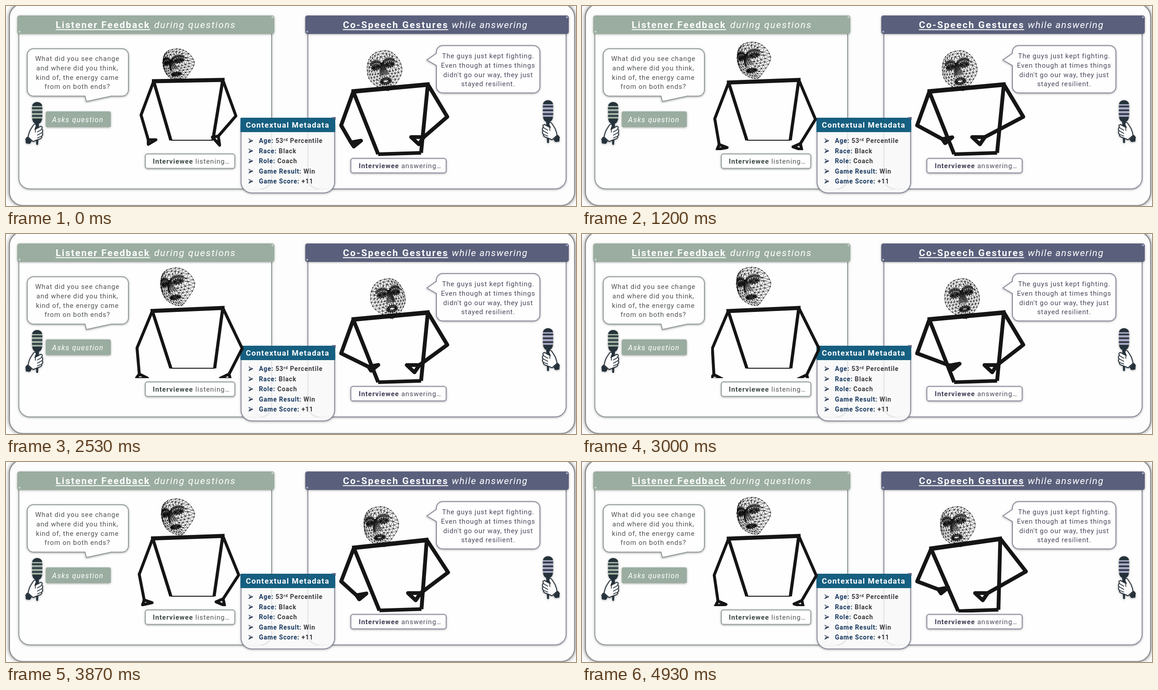
These frames come from a looping animation (1262 by 444 pixels, 5 s). An HTML page:

```html
<!DOCTYPE html>
<html lang="en">
<head>
<meta charset="utf-8">
<title>Interview gestures</title>
<style>
html, body { margin: 0; width: 100%; height: 100%; overflow: hidden; background: #fdfdfd; }
svg { display: block; width: 1262px; height: 444px; font-family: Roboto, sans-serif; }
.head { font-size: 21px; fill: #fff; }
.b { font-weight: 700; }
.i { font-style: italic; }
.say { font-size: 15px; letter-spacing: .88px; text-anchor: middle; }
.tag { font-size: 15px; letter-spacing: 1px; }
.meta { font-size: 14px; font-weight: 700; letter-spacing: .85px; fill: #3b3b40; }
.meta .k { fill: #17375e; }
.green { stroke: #929c97; }
.violet { stroke: #8a8c9e; }
.box { fill: #fefefe; stroke-width: 2; filter: url(#shade); }
.man { fill: none; stroke: #151515; stroke-linejoin: round; }
.mesh { fill: none; stroke: #121212; stroke-width: .8; }
.dots { fill: none; stroke: #0c0c0c; stroke-width: 2; stroke-linecap: round; }
</style>
</head>
<body>
<svg viewBox="0 0 1262 444">
  <defs>
    <filter id="shade" x="-10%" y="-20%" width="120%" height="140%">
      <feDropShadow dx="0" dy="1" stdDeviation="2" flood-color="#444" flood-opacity=".5"/>
    </filter>
    <filter id="deep">
      <feDropShadow dx="0" dy="0" stdDeviation="4" flood-color="#555" flood-opacity=".7"/>
    </filter>
    <clipPath id="clipL"><rect x="286" y="64" width="241" height="256"/></clipPath>
    <clipPath id="clipR"><rect x="732" y="68" width="279" height="266"/></clipPath>
    <g id="mic">
      <path d="M58 222a11 9 0 0 1 22 0Z" fill="#27313a"/>
      <path d="M58 222H80V250H58Z" fill="currentColor"/>
      <path d="M57.500 227H80.500M57.500 235.500H80.500M57.500 244H80.500" stroke="#27313a" stroke-width="3.500"/>
      <path d="M58 250H80Q79 259 73 261L71 308H67L65 261Q59 259 58 250Z" fill="#27313a"/>
      <path d="M61 264Q66 260 67 266L64 274L77 267Q82 268 79 273Q83 276 80 281Q83 285 79 289Q80 293 75 295L67 298L60 301L49 291Q51 281 54 275Z"
        fill="#fdfdfd" stroke="#27313a" stroke-width="2" stroke-linejoin="round"/>
      <path d="M65 274V281M69 280L79 274M69 287L80 281M69 293L79 289" fill="none" stroke="#27313a" stroke-width="1.600"/>
      <path d="M47 290L57 300L53 306L44 305L43 295Z" fill="#27313a"/>
    </g>
  </defs>

  <rect width="1262" height="444" fill="#fdfdfd"/>
  <rect x="7.500" y="-5" width="1251.500" height="448" rx="30" fill="#fdfdfd" stroke="#8f8f8f" stroke-width="2.500" filter="url(#deep)"/>

  <path class="box green" d="M28.500 50H588V382a24 24 0 0 1 -24 24H52.500a24 24 0 0 1 -24 -24Z"/>
  <path class="box violet" d="M668.500 50H1240V382a24 24 0 0 1 -24 24H692.500a24 24 0 0 1 -24 -24Z"/>
  <g filter="url(#shade)">
    <rect x="25" y="21" width="569" height="41" rx="5" fill="#9aada0"/>
    <rect x="662.500" y="21" width="583.500" height="41" rx="5" fill="#5a607c"/>
  </g>
  <g fill="#fff" opacity=".55">
    <circle cx="30" cy="57" r="2"/><circle cx="590" cy="25" r="2"/>
    <circle cx="667" cy="57" r="2"/><circle cx="1242" cy="25" r="2"/>
  </g>
  <g class="head">
    <text class="b" x="110" y="49" letter-spacing="2.1">Listener Feedback</text>
    <text class="i" x="328" y="49" letter-spacing="1.85">during questions</text>
    <text class="b" x="746" y="49" letter-spacing="2.2">Co-Speech Gestures</text>
    <text class="i" x="987" y="49" letter-spacing="1.5">while answering</text>
    <path d="M110 52.500H319M746 52.500H979" stroke="#fff" stroke-width="1.800"/>
  </g>

  <path class="box green" d="M61 95H257a14 14 0 0 1 14 14V186a14 14 0 0 1 -14 14H233L178 212L175 200H61a14 14 0 0 1 -14 -14V109a14 14 0 0 1 14 -14Z"/>
  <g class="say" fill="#4f5552">
    <text x="158" y="122">What did you see change</text>
    <text x="158" y="143">and where did you think,</text>
    <text x="158" y="163.500">kind of, the energy came</text>
    <text x="158" y="184">from on both ends?</text>
  </g>
  <path class="box violet" d="M967 88H1168a14 14 0 0 1 14 14V179a14 14 0 0 1 -14 14H967a14 14 0 0 1 -14 -14V132L932 120L953 105V102a14 14 0 0 1 14 -14Z"/>
  <g class="say" fill="#4b485c">
    <text x="1067.500" y="116">The guys just kept fighting.</text>
    <text x="1067.500" y="137">Even though at times things</text>
    <text x="1067.500" y="157.500">didn't go our way, they just</text>
    <text x="1067.500" y="178">stayed resilient.</text>
  </g>

  <use href="#mic" color="#9aada0" filter="url(#shade)"/>
  <use href="#mic" color="#aaa8c6" filter="url(#shade)" transform="matrix(-1 0 0 1 1269 -4)"/>
  <rect x="88" y="234" width="144" height="35" rx="4" fill="#9aada0" filter="url(#shade)"/>
  <text class="i" x="102" y="258" font-size="16" letter-spacing="1.25" fill="#fff">Asks question</text>

  <g class="tag">
    <rect class="box green" x="308.500" y="328.500" width="198" height="32" rx="5"/>
    <text x="325" y="350" fill="#4f5552"><tspan class="b" fill="#3c4a43">Interviewee</tspan> listening…</text>
    <rect class="box violet" x="763.500" y="338.500" width="211" height="32" rx="5"/>
    <text x="781" y="360" fill="#4b485c"><tspan class="b" fill="#3f3d55">Interviewee</tspan> answering…</text>
  </g>

  <path class="box violet" fill-opacity=".9" d="M520.500 264H727.500V391a24 24 0 0 1 -24 24H544.500a24 24 0 0 1 -24 -24Z"/>
  <path d="M588 281V382a24 24 0 0 1 -24 24M668.500 281V382a24 24 0 0 0 24 24" fill="none" stroke="#8b8aa0" stroke-opacity=".16" stroke-width="2"/>
  <rect x="519" y="248" width="210" height="32" rx="2" fill="#165f80"/>
  <path d="M721 246.500H730V253Z" fill="#6d6985"/>
  <text class="b" x="531" y="270" font-size="17" letter-spacing="1.35" fill="#fff">Contextual Metadata</text>
  <g class="meta">
    <text x="560" y="304"><tspan class="k">Age:</tspan> 53<tspan font-size="9" dy="-4">rd</tspan><tspan dy="4"> Percentile</tspan></text>
    <text x="560" y="326.500"><tspan class="k">Race:</tspan> Black</text>
    <text x="560" y="349"><tspan class="k">Role:</tspan> Coach</text>
    <text x="560" y="371.500"><tspan class="k">Game Result:</tspan> Win</text>
    <text x="560" y="394"><tspan class="k">Game Score:</tspan> +11</text>
  </g>
  <g id="bullets" fill="#2b3d55" stroke="#2b3d55" stroke-linejoin="round"></g>

  <g id="left" clip-path="url(#clipL)"></g>
  <g id="right" clip-path="url(#clipR)"></g>
</svg>

<script>
const LOOP = 5000, FPS = 15;
const TIMES = [0, 667, 1800, 2533, 3000, 3867, 4933];
// One value per key time.
const SPREAD = [0, .45, .7, 1, 1.15, .45, .7];
const REACH_L = [764, 782, 817, 802, 814, 776, 789];
const REACH_R = [925, 896, 887, 916, 919, 918, 898];
const LEAN = [0, 0, 0, 0, 0, .3, 1];
const YAW = [-.08, -.22, -.05, .18, .04, -.32, -.28];

const $ = id => document.getElementById(id);
const mix = (a, b, u) => a + (b - a) * u;

function at(track, t) {
  let k = 0;
  while (k < TIMES.length - 2 && t >= TIMES[k + 1]) k++;
  const u = Math.min(1, (t - TIMES[k]) / (TIMES[k + 1] - TIMES[k]));
  return mix(track[k], track[k + 1], u * u * (3 - 2 * u));
}

for (let i = 0; i < 5; i++) {
  const y = 294.5 + i * 22.5;
  $("bullets").innerHTML += `<path d="M537.500 ${y}l9 4.500l-9 4.500l3 -4.500Z" fill="none"/>
    <path d="M540.500 ${y + 4.5}h6l-9 4.500Z"/>`;
}

let seed = 11;
const rand = () => (seed = seed * 16807 % 2147483647) / 2147483647;

// Facial landmarks on a unit face: x right, y down.
function landmarks() {
  const pts = [];
  const add = (x, y, part) => {
    if (part || pts.every(p => Math.hypot(p.x - x, p.y - y) > .1))
      pts.push({ x: x + (rand() - .5) * .01, y: y + (rand() - .5) * .01, part });
  };
  const ring = (cx, cy, rx, ry, n, part) => {
    for (let i = 0; i < n; i++) {
      const a = i / n * 2 * Math.PI;
      add(cx + rx * Math.cos(a), cy + ry * Math.sin(a), part);
    }
  };
  for (const s of [-1, 1]) {
    for (let k = 0; k < 4; k++) ring(s * .4, -.23, .13 + k * .045, .03 + k * .04, 13, "eye");
    for (let i = 0; i < 9; i++) for (let j = 0; j < 3; j++)
      add(s * (.12 + i * .07), -.47 + j * .05 - .08 * Math.sin(i / 8 * Math.PI), "brow");
  }
  for (let j = 0; j < 10; j++) for (let i = -3; i < 4; i++)
    add(i * (.025 + j * .006), -.36 + j * .065, "nose");
  for (let k = 0; k < 4; k++) ring(0, .55, .18 + k * .045, .02 + k * .035, 16, k ? "mouth" : "lip");
  for (let k = 0; k < 6; k++) {
    const r = 1 - k * .155, n = 32 - k * 3;
    for (let i = 0; i < n; i++) {
      const a = (i + k % 2 / 2) / n * 2 * Math.PI, sx = Math.sin(a), y = -Math.cos(a);
      const x = y > 0 ? sx * (1 - .4 * y * y) : Math.sign(sx) * Math.abs(sx) ** .8;
      add(r * x, r * y, k ? "" : "rim");
    }
  }
  for (const p of pts) {
    const { x, y } = p;
    p.z = .6 * Math.sqrt(Math.max(0, 1 - x * x - y * y)) - .25 * x * x
      + .3 * Math.exp(-x * x / .02 - (y - .14) ** 2 / .06)
      - (p.part === "eye" ? .05 : 0);
  }
  return pts;
}

// Delaunay edges by incremental insertion.
function connect(pts) {
  const n = pts.length;
  const all = pts.concat([{ x: -20, y: -20 }, { x: 20, y: -20 }, { x: 0, y: 30 }]);
  const tri = (a, b, c) => {
    const A = all[a], bx = all[b].x - A.x, by = all[b].y - A.y;
    const cx = all[c].x - A.x, cy = all[c].y - A.y, d = 2 * (bx * cy - by * cx) || 1e-9;
    const b2 = bx * bx + by * by, c2 = cx * cx + cy * cy;
    const ux = (cy * b2 - by * c2) / d, uy = (bx * c2 - cx * b2) / d;
    return { v: [a, b, c], x: A.x + ux, y: A.y + uy, r: ux * ux + uy * uy };
  };
  const sides = t => t.v.map((a, i) => [a, t.v[(i + 1) % 3]].sort((p, q) => p - q));
  let tris = [tri(n, n + 1, n + 2)];
  for (let i = 0; i < n; i++) {
    const p = all[i], hole = new Map(), keep = [];
    for (const t of tris) {
      if ((p.x - t.x) ** 2 + (p.y - t.y) ** 2 >= t.r) { keep.push(t); continue; }
      for (const e of sides(t)) hole.has(e + "") ? hole.delete(e + "") : hole.set(e + "", e);
    }
    for (const [a, b] of hole.values()) keep.push(tri(a, b, i));
    tris = keep;
  }
  const edges = new Map();
  for (const t of tris) {
    if (t.v.some(i => i >= n) || t.v.every(i => pts[i].part === "lip")) continue;
    for (const e of sides(t)) edges.set(e + "", e);
  }
  return [...edges.values()];
}

const face = landmarks(), links = connect(face);

// Turns the face and fits it into a box.
function project({ x, y, w, h, yaw, tilt, open }) {
  const c = Math.cos(tilt), s = Math.sin(tilt), pitch = -.08;
  const raw = face.map(p => {
    const lips = p.part === "lip" || p.part === "mouth";
    const part = lips ? Math.max(-1, Math.min(1, (p.y - .55) / .03)) * (1 - (p.x / .34) ** 2) : 0;
    const px = p.x * Math.cos(yaw) + p.z * Math.sin(yaw);
    const py = 1.15 * ((p.y + part * open) * Math.cos(pitch) + p.z * Math.sin(pitch));
    return [px * c + py * s, py * c - px * s];
  });
  const fit = (i, start, size) => {
    const list = raw.map(p => p[i]), lo = Math.min(...list), hi = Math.max(...list);
    return v => (start + (v - lo) / (hi - lo) * size).toFixed(1);
  };
  const fx = fit(0, x, w), fy = fit(1, y, h);
  return raw.map(p => fx(p[0]) + " " + fy(p[1]));
}

// Arms sink and open as spread grows; heights settle sooner than widths.
function listener(t) {
  const s = at(SPREAD, t), q = Math.sqrt(s);
  const move = (x0, y0, x1, y1) => [mix(x0, x1, s), mix(y0, y1, q)];
  return {
    shoulders: [[mix(327, 324, q), mix(167, 171, q)], [480, 164]],
    hips: [[365, 298], [mix(458, 462, q), 298]],
    elbows: [move(299, 242, 290, 253), move(509, 244, 523, 254)],
    hands: [
      [move(315, 297, 295, 311), move(332, 297, 313, 320), move(315, 307, 287, 322)],
      [move(470, 289, 494, 311), move(457, 291, 475, 320), move(473, 309, 497, 323)]
    ],
    face: { x: mix(347, 342, q), y: mix(95, 75, q), w: mix(70, 76, q), h: mix(72, 84, q), yaw: -.48, tilt: .25, open: 0 }
  };
}

// Hands keep their shape and slide with the wrists.
function speaker(t) {
  const lean = at(LEAN, t), yaw = at(YAW, t), xl = at(REACH_L, t), xr = at(REACH_R, t);
  const yl = 303 - .22 * (xl - 764) - 15 * lean, yr = 291;
  return {
    shoulders: [[769 + 4 * lean, 190 + 3 * lean], [934 - 8 * lean, 174 - 4 * lean]],
    hips: [[824 + 9 * lean, 329 + 2 * lean], [919 + 3 * lean, 326 + 2 * lean]],
    elbows: [[742, 265], [977 + 6 * lean, 246 - 3 * lean]],
    hands: [
      [[xl, yl], [xl + 22, yl - 4], [xl + 6, yl + 9]],
      [[xr, yr], [xr - 28, yr], [xr - 11, yr + 16]]
    ],
    face: { x: 802 + 30 * yaw, y: 99, w: 77, h: 89, yaw, tilt: .2, open: .05 + .03 * Math.sin(t / 130) }
  };
}

const line = pts => "M" + pts.map(p => p.join(" ")).join("L");

function figure(id, pose, w) {
  const make = (cls, width) => {
    const el = document.createElementNS("http://www.w3.org/2000/svg", "path");
    el.setAttribute("class", cls);
    if (width) el.setAttribute("stroke-width", width);
    $(id).append(el);
    return d => el.setAttribute("d", d);
  };
  const torso = make("man", w.torso), hip = make("man", w.hip), arms = make("man", w.arm);
  const bar = make("man", w.bar), hands = make("man", w.arm);
  const mesh = make("mesh"), dots = make("dots");
  return t => {
    const { shoulders: [a, b], hips, elbows, hands: palms, face: head } = pose(t);
    torso(line([a, hips[0]]) + line([b, hips[1]]));
    hip(line(hips));
    arms(line([a, elbows[0], palms[0][0]]) + line([b, elbows[1], palms[1][0]]));
    bar(line([[a[0] - 4, a[1]], [b[0] + 4, b[1]]]));
    hands(palms.map(h => line(h) + "Z").join(""));
    const p = project(head);
    mesh(links.map(([i, j]) => `M${p[i]}L${p[j]}`).join(""));
    dots(p.map(q => `M${q}h0`).join(""));
  };
}

const people = [
  figure("left", listener, { torso: 7, hip: 1.8, arm: 6.5, bar: 9 }),
  figure("right", speaker, { torso: 8.5, hip: 8, arm: 8.5, bar: 10 })
];

let last = -1;
function tick(now) {
  const step = Math.floor(now % LOOP * FPS / 1000);
  if (step !== last) {
    last = step;
    for (const draw of people) draw(step * 1000 / FPS);
  }
  requestAnimationFrame(tick);
}
tick(performance.now());
</script>
</body>
</html>
```
